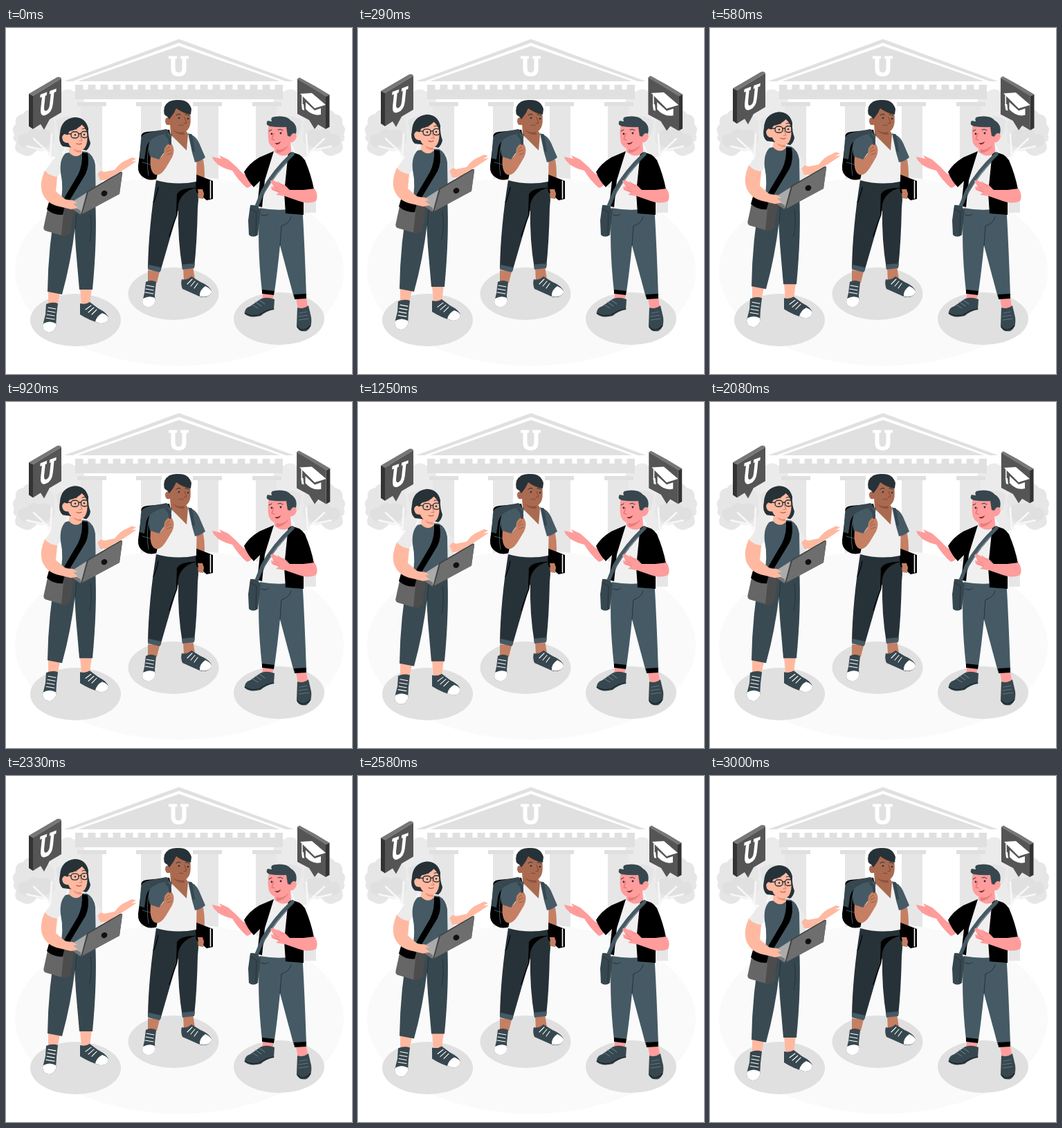
An HTML page that plays this animation: 500 px wide and 500 px high, repeating every 3.04 s.

```html
<!DOCTYPE html>
<html lang="en">
<head>
<meta charset="utf-8">
<title>Students talking on campus</title>
<style>
html, body { margin: 0; width: 100%; height: 100%; overflow: hidden; background: #fff; }
svg { display: block; width: 100vw; height: 100vh; }
.line { fill: none; stroke-linecap: round; stroke-linejoin: round; }
.lace { fill: none; stroke: #fff; stroke-width: 1.1; stroke-linecap: round; }
.ink { fill: #263238; }
.slate { fill: #455a64; }
.deep { fill: #37474f; }
.peach { fill: #ffb9a1; }
.brown { fill: #aa6a50; }
.tan { fill: #c57f63; }
.pink { fill: #ff9c9c; }
.pale { fill: #ebebeb; }
.grey { fill: #e0e0e0; }
.white { fill: #fff; }
</style>
</head>
<body>
<svg viewBox="0 0 500 500" xmlns="http://www.w3.org/2000/svg">
<defs>
  <path id="u" d="M-14.500-14.500H-2.500v4H-5V3q0 6.500 5 6.500T5 3V-10.500H2.500v-4h12v4H11V4Q11 15 0 15T-11 4V-10.500h-3.500z"/>
  <g id="tree">
    <path class="pale" d="M62 184Q52 162 64 140Q60 124 68 116Q66 100 78 94Q88 84 99 92Q112 94 113 106Q124 114 119 128Q128 140 119 152Q120 172 104 180Q84 194 62 184Z"/>
    <path fill="#e4e4e4" d="M72 134Q88 122 104 132Q118 140 108 156Q92 168 76 154Z"/>
    <path fill="#e6e6e6" d="M12 154Q7 145 14 139Q12 126 25 124Q30 115 42 120Q55 114 62 127Q74 135 69 150Q75 164 63 172Q55 181 45 176Q34 190 22 182Q9 178 15 165Q8 161 12 154Z"/>
    <path class="grey" d="M17 163Q17 151 30 153Q36 142 48 148Q62 143 67 156Q67 170 54 173Q44 176 36 172Q20 176 17 163Z"/>
    <path class="line" stroke="#f8f8f8" stroke-width="2.500" d="M74 215Q68 184 55 174L40 160M58 177L30 171M64 185L66 153M74 210Q80 177 98 155M83 182L108 171"/>
  </g>
</defs>

<use href="#tree"/>
<use href="#tree" transform="matrix(-1 0 0 1 500 0)"/>

<!-- University building -->
<path class="grey" d="M84 77L250 16L416 77H404L250 21.500L96 77Z"/>
<path class="grey" d="M104 77L250 26L396 77Z"/>
<path class="grey" d="M100 82H400V103H100Z"/>
<path stroke="#fff" stroke-width="7" stroke-dasharray="7 11" d="M111.500 85.500H388.500"/>
<use href="#u" x="249.500" y="55" fill="#fff"/>
<path fill="#e6e6e6" d="M108 113h31v118h-31zM195 113h29v118h-29zM277 113h30v118h-30zM361 113h30v118h-30z"/>
<path class="grey" d="M103 107h42v6h-42zM188 107h37v6h-37zM270 107h42v6h-42zM356 107h42v6h-42z"/>

<ellipse cx="250.500" cy="351" rx="237.500" ry="137" fill="#fafafa"/>
<path fill="#e6e6e6" d="M430 250h18v17h-18z"/>
<g class="grey">
  <ellipse cx="100.500" cy="422" rx="65.500" ry="38"/>
  <ellipse cx="242" cy="384" rx="65.500" ry="38"/>
  <ellipse cx="394.500" cy="420" rx="65.500" ry="38"/>
</g>

<!-- Cap sign -->
<g id="cap">
  <path fill="#777" d="M421 73.500L424 71.500Q446 83 467.500 96.500L462 100Z"/>
  <path fill="#333" d="M462 99.500L467.500 96.500V143L462 146Z"/>
  <path fill="#555" d="M421 73.500L462 99V146L451 139.500L446 146L438 133L421 124Z"/>
  <path class="white" d="M425 95L442 94L462 111L446 116Z"/>
  <path class="white" d="M433 107L446 119L455 116V125Q443 128 433 117Z"/>
  <path class="line" stroke="#fff" stroke-width="1.500" d="M428 98V111"/>
  <path class="white" d="M427 110h3l1 9l-3-1z"/>
</g>

<!-- Student with backpack -->
<g>
  <path fill="#000" d="M196 160Q193 151 204 150L236 147L242 172L223 216Q209 223 199 216Q190 211 191 199Z"/>
  <path class="deep" d="M195 161Q196 153 206 151L232 146Q238 150 236 159L210 163Q203 166 202 177L200 190L193 188Z"/>
  <path class="line" stroke="#455a64" stroke-width="1" d="M207 168Q202 190 206 213M197 194L218 200"/>
  <path class="tan" d="M205 350L222 352L218 368L205 369ZM256 346L270 344L273 363L257 366Z"/>
  <path class="deep" d="M202 367Q209 363 217 367L215 386Q217 399 208 403Q197 404 197 396L200 383Z"/>
  <path class="white" d="M198 391Q207 386 215 390Q217 399 208 403Q197 404 197 396Z"/>
  <path class="lace" d="M203 372L214 374M202 377L213 379M201 382L213 384"/>
  <path class="deep" d="M254 363Q261 365 268 359L281 367Q297 374 297 382Q294 390 282 389L255 377Q252 370 254 363Z"/>
  <path class="white" d="M288 373Q297 377 297 382Q294 390 280 388Q279 379 288 373Z"/>
  <path class="lace" d="M269 363L262 370M273 366L267 373M277 369L272 376"/>
  <path class="ink" d="M217 220H274Q280 236 277 260Q276 310 272 346L255 348Q248 306 249 263L238 300L223 352L205 347Q206 289 217 220Z"/>
  <path class="line" stroke="#000" stroke-width="1.200" d="M274 231Q254 233 249 243L247 270Q242 282 236 301M220 230Q217 245 213 252"/>
  <path fill="#000" d="M247 240Q252 231 274 231Q253 237 249 255L246 268Z"/>
  <path class="slate" d="M206 342L224 346L222 353L205 349ZM254 342L273 340L272 347L255 349Z"/>
  <path class="tan" d="M273 193L285 190Q289 210 285 235L284 246L278 246L276 222Z"/>
  <path fill="#000" d="M273 211L299 221V247L290 249L275 237Z"/>
  <path class="line" stroke="#fff" stroke-width="1.600" d="M295.500 221V246"/>
  <path class="tan" d="M277 233L284 233L286 239L285 247L279 246Z"/>
  <path fill="#f0f0f0" d="M224 161L239 152L266 153L276 162L275 222Q246 228 217 220L222 195Z"/>
  <path class="slate" d="M263 152Q274 155 279 166L288 187Q281 193 273 194L269 180Z"/>
  <path class="brown" d="M237 138L258 145L263 153L261 177L238 154Z"/>
  <path fill="#8b523e" d="M241 147Q250 153 257 149L258 154Q247 155 241 147Z"/>
  <path class="slate" d="M208 163Q222 151 240 153L237 172Q226 181 221 191L208 186Q204 173 208 163Z"/>
  <path class="tan" d="M209 186L221 190L228 182L229 174Q235 164 240 168Q245 177 240 187L231 202Q222 216 214 211Q207 205 209 186Z"/>
  <path class="line" stroke="#8b523e" stroke-width=".8" d="M232 179L238 176M233 183L239 181M231 176L236 172"/>
  <path class="line" stroke="#37474f" stroke-width="4" d="M232 155Q238 159 237 167M267 155L271 177"/>
  <path class="brown" d="M235 116H265Q268 132 266 140Q264 150 254 151Q243 149 239 139Q231 143 230 135Q230 128 236 130Z"/>
  <path class="ink" d="M236 132L233 128Q226 126 229 114Q234 103 248 104Q264 103 268 117L267 125Q255 123 246 116Q243 123 239 128Z"/>
  <g class="line" stroke="#263238" stroke-width="1">
    <path d="M246 126Q249 123 252 125M259 125Q263 124 265 127"/>
    <path stroke="#7b4635" d="M258 129L261 137L257 138M250 141Q253 139 256 141"/>
  </g>
  <circle class="ink" cx="250" cy="130" r="1.300"/><circle class="ink" cx="263" cy="131" r="1.300"/>
</g>

<!-- Student with shoulder bag -->
<g>
  <path class="pink" d="M371 384L387 386L384 396L370 396ZM419 390H434L437 407H422Z"/>
  <path class="deep" d="M366 393Q374 387 388 392L387 407Q376 409 368 416Q352 420 345 413Q344 405 353 402Z"/>
  <path class="line" stroke="#172126" stroke-width="1.200" d="M345 412Q355 418 367 414Q376 407 387 406"/>
  <path class="lace" style="stroke:#607580" d="M361 396L369 402M366 393L374 399M356 400L364 405"/>
  <path class="deep" d="M421 404Q429 407 437 401L441 418Q443 433 434 438Q423 440 420 431Z"/>
  <path class="lace" style="stroke:#607580" d="M424 412L435 410M423 417L436 415M423 422L437 420"/>
  <path class="line" stroke="#172126" stroke-width="1.200" d="M421 432Q430 441 440 430"/>
  <path class="slate" d="M367 255H428Q431 300 434 387L416 389Q406 352 396 314Q392 354 388 381L370 381Q362 309 367 255Z"/>
  <path class="line" stroke="#263238" stroke-width="1" d="M396 314L398 286Q410 282 412 273M369 270Q376 273 379 269"/>
  <path fill="#000" d="M370 378L388 380L387 386L370 384ZM416 385L434 384V391L417 392Z"/>
  <path class="pink" d="M342 210Q332 199 321 190L308 184L311 189L298 186L300 191L307 198Q317 204 327 206Q337 222 348 231Q357 229 359 219Z"/>
  <path fill="#f0f0f0" d="M381 180L410 179L409 262Q388 264 366 260L373 219Z"/>
  <path fill="#000" d="M387 178L366 187Q351 196 344 208Q349 221 358 230L367 221L363 257L370 259L374 220Z"/>
  <path fill="#000" d="M408 179Q425 180 432 191Q441 212 445 233L430 236V270L404 268L402 238Z"/>
  <path class="line" stroke="#455a64" stroke-width="5.500" d="M414 182Q387 207 371 236L360 263"/>
  <path class="line" stroke="#263238" stroke-width=".8" d="M416 184Q390 210 374 237L364 260"/>
  <path class="deep" d="M353 256Q361 254 368 263L364 299Q357 304 351 299L350 278Z"/>
  <path class="line" stroke="#263238" stroke-width="1" d="M353 261L362 266L361 299"/>
  <path class="pink" d="M430 234L446 232Q452 242 448 250Q437 255 423 250L403 243L390 241L394 238L384 234L383 229L388 230L382 222Q383 217 390 222L403 227L410 234Z"/>
  <path class="line" stroke="#e77b7e" stroke-width=".8" d="M386 228L394 233M387 234L396 237M393 222L401 229"/>
  <path class="pink" d="M388 164L411 161L412 179Q402 190 388 179Z"/>
  <path fill="#e77b7e" d="M391 174Q402 176 408 165L407 172Q398 182 391 180Z"/>
  <path class="pink" d="M380 138H406L411 153Q419 149 420 157Q417 167 410 165Q408 174 395 176Q384 175 380 166Q377 153 380 138Z"/>
  <path class="deep" d="M381 142Q374 139 378 134L384 135Q381 128 390 128Q405 126 412 134Q422 140 419 153Q414 150 411 157L407 156L405 143Q394 144 381 142Z"/>
  <g class="line" stroke="#263238" stroke-width="1">
    <path d="M380 149L384 147M393 147Q397 145 400 148"/>
    <path stroke="#d96569" d="M387 153L384 161L388 162"/>
  </g>
  <circle class="ink" cx="384" cy="153" r="1.400"/><circle class="ink" cx="397" cy="152" r="1.400"/>
  <path fill="#7d2e33" d="M388 166Q393 167 397 164Q396 168 391 168.500Z"/>
</g>

<!-- Floating group: sign and student with laptop -->
<g id="float">
  <path fill="#777" d="M33 95L74 71Q79 70 80 73L39 98Z"/>
  <path fill="#333" d="M33 95L39 98V146L33 142Z"/>
  <path fill="#555" d="M39 98L80 73V122L63 132L55 147L50 139L39 146Z"/>
  <use href="#u" transform="matrix(.8 -.3 -.12 1.150 59.500 108.500)" fill="#fff"/>

  <path class="peach" d="M61 381L78 383L74 402H61ZM107 376L124 375L121 400H109Z"/>
  <path class="deep" d="M58 399Q67 395 75 398L73 415L72 432Q69 440 62 440Q53 439 53 430L57 414Z"/>
  <path class="white" d="M54 427Q63 422 72 427V432Q69 440 62 440Q53 439 53 430Z"/>
  <path class="lace" d="M61 404L72 406M60 409L71 411M59 414L70 416M58 419L70 421"/>
  <path class="deep" d="M107 398Q115 400 121 396L133 405Q147 412 148 419Q147 427 137 427Q121 423 107 414Z"/>
  <path class="white" d="M139 412Q147 415 148 419Q147 427 137 427L129 424.500Q131 416 139 412Z"/>
  <path class="lace" d="M123 401L115 407M127 404L119 411M131 407L124 414"/>
  <path class="deep" d="M99 250H129Q132 303 125 378L106 378L101 320L99 286Z"/>
  <path fill="#394a52" d="M73 250H102L100 286Q94 338 81 385L60 381Q61 314 73 250Z"/>
  <path class="line" stroke="#263238" stroke-width="1" d="M102 268L100 290M122 270Q125 291 121 309"/>

  <path class="peach" d="M130 204L142 208L157 205Q165 194 174 191L182 187L188 189L181 193L189 192L179 199Q169 206 157 212Q146 222 136 220Z"/>
  <path class="pale" d="M118 182Q128 183 133 196L138 204Q134 211 127 213Z"/>
  <path class="pale" d="M93 179Q74 182 66 193L56 207Q63 214 74 215L87 200Z"/>
  <path class="slate" d="M86 181Q102 177 117 179Q127 184 129 198L130 256Q103 266 78 258Q84 232 79 209Q77 190 86 181Z"/>
  <path class="peach" d="M92 168L109 170L110 181Q101 190 91 180Z"/>
  <path fill="#e99177" d="M95 172Q103 179 108 175L109 180Q100 181 95 172Z"/>
  <path fill="#666" d="M63 248L97 262L93 296Q88 301 81 300L57 293Q53 291 55 285Z"/>
  <path fill="#4c4c4c" d="M84 260L98 262L93 297Q87 302 80 300Z"/>
  <path fill="#000" d="M64 245L86 253L82 270Q69 271 59 262Z"/>
  <path fill="#000" d="M110 180L118 181Q121 198 115 211L92 249L84 246L104 212Q111 198 110 180Z"/>

  <path fill="#ababab" d="M91 254L118 237L124 245L110 268L93 260Z"/>
  <path fill="#777" d="M91 254L108 264V270L92 259Z"/>
  <path class="peach" d="M56 206Q63 214 74 215L72 236L86 248L97 249L103 253L97 254L104 260L94 262L73 257Q57 252 52 237Q48 224 56 206Z"/>
  <path fill="#444" d="M117 236L165 208Q169 207 168 211L164 239L108 270Z"/>
  <path fill="#6e6e6e" d="M119 237L168 208L164 240L110 269Z"/>
  <ellipse cx="142" cy="239" rx="4.500" ry="4" transform="rotate(-30 142 239)" fill="#111"/>

  <path class="ink" d="M82 171Q75 165 78 152Q79 132 99 129Q115 129 119 145Q118 155 122 166Q121 173 116 177L105 174Z"/>
  <path class="peach" d="M90 147Q99 146 107 138Q115 143 117 151Q119 165 114 173Q109 179 101 176Q93 174 90 166Q82 167 81 158Q83 151 90 154Z"/>
  <path class="ink" d="M88 155Q82 147 90 138Q102 131 111 138Q104 147 92 149Z"/>
  <g class="line" stroke="#263238" stroke-width="1.400">
    <rect x="94" y="150" width="11" height="9" rx="4"/>
    <rect x="108.500" y="149.500" width="10" height="9" rx="4"/>
    <path d="M105 153L108.500 152.500M94 153L86 153"/>
    <path stroke-width="1" d="M96 147Q99 145 102 146M110 146Q113 144 116 146"/>
    <path stroke="#d87562" stroke-width="1" d="M107 156L110 163L106 163"/>
    <path stroke="#b74a43" stroke-width="1.200" d="M102 167Q106 169 109 167"/>
  </g>
  <circle class="ink" cx="100" cy="154.500" r="1.300"/><circle class="ink" cx="113" cy="154" r="1.300"/>
</g>
</svg>

<script>
const LOOP = 3040, FLOAT = 1500, FPS = 24, LAST = 72;
const group = document.getElementById('float');
const cap = document.getElementById('cap');

// Scale of the cap sign over time: [ms, scale]
const pulse = [[0, 1], [300, 1.07], [580, 1.045], [1250, 1.03], [1670, 1.02], [2190, 1], [LOOP, 1]];

function mix(steps, t) {
  const i = steps.findIndex(s => s[0] > t);
  const [t0, a] = steps[i - 1], [t1, b] = steps[i];
  return a + (b - a) * (t - t0) / (t1 - t0);
}

function draw(now) {
  const step = Math.min(LAST, Math.floor((now % LOOP) * FPS / 1000 + 0.2));
  const t = step * 1000 / FPS;
  const phase = (t / FLOAT) % 1;
  const lift = 10 * (1 - Math.abs(1 - 2 * phase));
  group.setAttribute('transform', `translate(0 ${-lift})`);
  cap.setAttribute('transform', `translate(444.500 108) scale(${mix(pulse, t)}) translate(-444.500 -108)`);
}

const start = performance.now();
function tick() {
  draw(performance.now() - start);
  requestAnimationFrame(tick);
}
tick();
</script>
</body>
</html>
```
